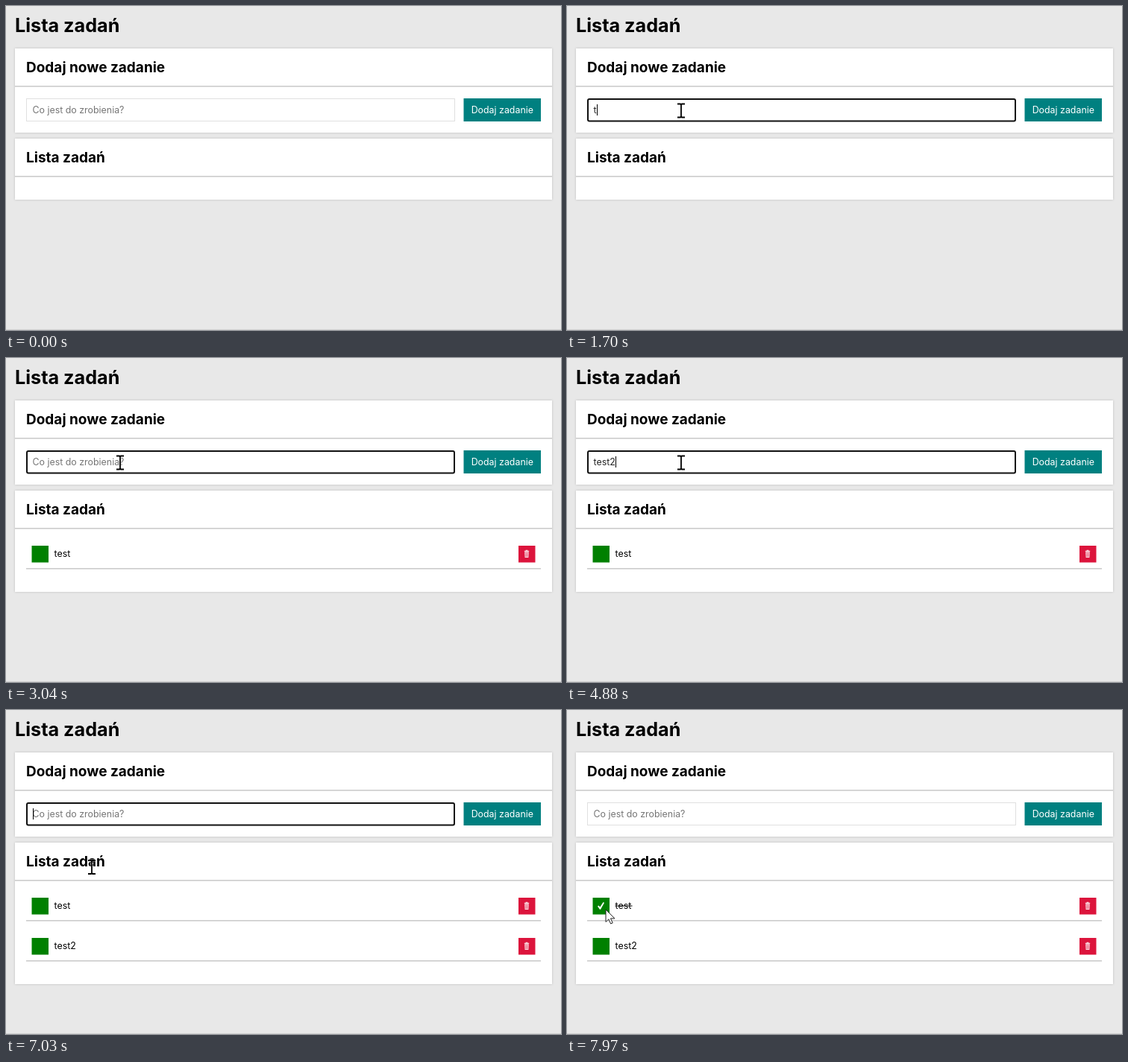
An HTML page for the animation above (8 s loop, 744 by 435 pixels).

```html
<!DOCTYPE html>
<html lang="pl">
<head>
<meta charset="utf-8">
<title>Lista zadań</title>
<style>
  html, body { margin: 0; width: 100%; height: 100%; overflow: hidden; background: #e8e8e8; }
  svg { display: block; width: 744px; height: 435px; font: 12.4px Inter, "Open Sans", sans-serif; }
  .title { font-size: 25.2px; font-weight: 700; }
  .heading { font-size: 19px; font-weight: 700; }
  .card { fill: #fff; filter: drop-shadow(0 0 1.5px #bbb); }
  .rule { fill: #ccc; }
</style>
</head>
<body>
<svg viewBox="0 0 744 435">
  <rect width="744" height="435" fill="#e8e8e8"/>
  <rect y="434" width="744" height="1" fill="#d2d2d2"/>
  <text class="title" x="12" y="35">Lista zadań</text>

  <rect class="card" x="12" y="57" width="720" height="113"/>
  <rect class="rule" x="12" y="107" width="720" height="1.6"/>
  <text class="heading" x="27" y="89">Dodaj nowe zadanie</text>
  <rect id="field"/>
  <text id="hint" x="35.5" y="143.5" fill="#757575">Co jest do zrobienia?</text>
  <text id="typed" x="35.5" y="143.5" fill="#222"></text>
  <rect id="caret" y="132" width="1" height="15"/>
  <rect x="613.5" y="124" width="103.5" height="31" fill="#008080"/>
  <text x="665.3" y="143.5" fill="#fff" text-anchor="middle">Dodaj zadanie</text>

  <rect class="card" id="list" x="12" y="178" width="720"/>
  <rect class="rule" x="12" y="228" width="720" height="1.6"/>
  <text class="heading" x="27" y="210">Lista zadań</text>
  <g id="rows"></g>

  <path id="arrow" d="M0 0V16.5L3.9 12.9 6.6 19 9.2 17.9 6.5 11.9H12Z" fill="#fff" stroke="#222" stroke-width="1"/>
  <g id="beam" fill="none">
    <path d="M-5-9H-1L0-8 1-9H5M0-8V8M-5 9H-1L0 8 1 9H5" stroke="#fff" stroke-width="3" opacity=".7"/>
    <path d="M-5-9H-1L0-8 1-9H5M0-8V8M-5 9H-1L0 8 1 9H5" stroke="#000" stroke-width="1.8"/>
  </g>
</svg>
<script>
const LOOP = 8000;
const byId = id => document.getElementById(id);
const [field, hint, typed, caret, list, rows, arrow, beam] =
  ["field", "hint", "typed", "caret", "list", "rows", "arrow", "beam"].map(byId);

const FOCUS = 715, BLUR = 7830, CHECK = 7900;
const typing = [[0, ""], [1700, "t"], [2100, "te"], [2300, "tes"], [2440, "test"], [3040, ""],
  [4030, "t"], [4160, "te"], [4420, "tes"], [4480, "test"], [4880, "test2"], [5470, ""]];
const caretOn = [[FOCUS, 1220], [1700, 2970], [3500, 5470], [5960, 6490], [6990, 7490]];
const tasks = [{ name: "test", added: 3040, done: CHECK }, { name: "test2", added: 5470, done: Infinity }];
// Pointer moves: start, end, from, to
const moves = [
  [70, 700, [215, 399], [163, 145]],
  [920, 1020, [163, 145], [153, 140.5]],
  [6260, 6290, [153, 140.5], [153, 138.5]],
  [6720, 7030, [153, 138.5], [115, 211]],
  [7320, 7760, [115, 211], [52, 268]]
];

function set(node, attrs) {
  for (const key in attrs) node.setAttribute(key, attrs[key]);
}
const show = (node, on) => { node.style.display = on ? "" : "none"; };

tasks.forEach((task, i) => {
  rows.insertAdjacentHTML("beforeend", `<g transform="translate(0 ${i * 54})">
    <rect x="34.5" y="252" width="22.5" height="22.5" fill="#008000"/>
    <path class="tick" d="M41 263.6L42.4 262.4 44.3 264.6 48.6 258 50 258.7 45 267.8 43.9 267.8Z" fill="#fff"/>
    <text x="64.5" y="267">${task.name}</text>
    <rect class="strike" x="64.5" y="262.5" width="23" height="1"/>
    <rect x="687" y="252" width="22.5" height="22.5" fill="#dc143c"/>
    <path d="M694.8 259.3H701.2M696.6 258.3H699.4" stroke="#fff" fill="none"/>
    <path d="M695.2 260.3H700.8L700.4 268H695.6Z" fill="#fff" opacity=".85"/>
    <path d="M696.8 261.3V267M698 261.3V267M699.2 261.3V267" stroke="#dc143c" stroke-width=".5"/>
    <rect class="rule" x="27" y="282" width="690" height="1.6"/>
  </g>`);
  task.node = rows.lastElementChild;
});

function pointerAt(t) {
  const [start, end, from, to] = moves.filter(m => t >= m[0]).pop() || moves[0];
  const p = Math.min(1, Math.max(0, (t - start) / (end - start)));
  const eased = p * p * (3 - 2 * p);
  return from.map((v, i) => v + (to[i] - v) * eased);
}

function drawPointer(t) {
  const [x, y] = pointerAt(t);
  const inside = (l, top, r, b) => x >= l && x <= r && y >= top && y <= b;
  const overText = inside(27, 124, 602, 155) || inside(27, 191, 134, 215);
  show(arrow, t >= 70 && !overText);
  show(beam, t >= 70 && overText);
  set(overText ? beam : arrow, { transform: `translate(${x} ${y})` });
}

function draw(t) {
  const focused = t >= FOCUS && t < BLUR;
  set(field, focused
    ? { x: 28, y: 125, width: 573, height: 29.5, rx: 2, fill: "#fff", stroke: "#101010", "stroke-width": 2 }
    : { x: 27.5, y: 124.5, width: 574, height: 30, rx: 0, fill: "#fff", stroke: "#e0e0e0", "stroke-width": 1 });

  const text = typing.filter(step => t >= step[0]).pop()[1];
  typed.textContent = text;
  show(hint, !text);
  show(caret, caretOn.some(([from, to]) => t >= from && t < to));
  set(caret, { x: text ? Math.round(35.5 + typed.getComputedTextLength()) : 36 });

  const count = tasks.filter(task => t >= task.added).length;
  set(list, { height: 82 + 54 * count });
  tasks.forEach(({ node, added, done }) => {
    show(node, t >= added);
    show(node.querySelector(".tick"), t >= done);
    show(node.querySelector(".strike"), t >= done);
  });
  drawPointer(t);
}

const begin = performance.now();
function frame() {
  draw((performance.now() - begin) % LOOP);
  requestAnimationFrame(frame);
}
frame();
</script>
</body>
</html>
```
